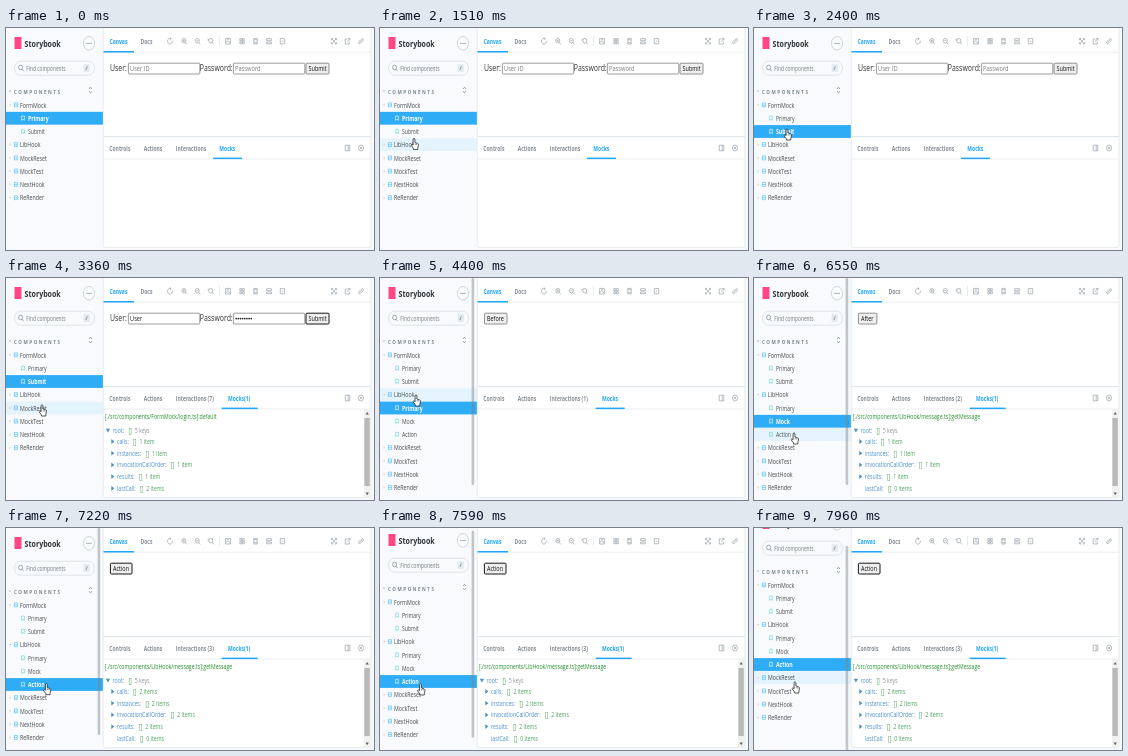
These frames come from a looping animation (368 by 222 pixels, 8 s). An HTML page:

```html
<!DOCTYPE html>
<html lang="en">
<head>
<meta charset="utf-8">
<title>Component explorer</title>
<style>
  html, body { margin: 0; width: 100%; height: 100%; overflow: hidden; background: #f8fafd; }
  svg { display: block; width: 100vw; height: 100vh; font-family: 'Open Sans', 'Noto Sans', sans-serif; }
  text { white-space: pre; }
</style>
</head>
<body>
<svg id="stage" viewBox="0 0 368 222"></svg>
<script>
const LOOP = 8000, ROW = 13.25, BAR = 12.8, FIRST_ROW = 77;
const SQUEEZE = 0.76; // the whole screen is narrower than its natural aspect
const BLUE = '#1ea7fd', GREY = '#98a2ab', TEAL = '#5fd6d2';
const stage = document.getElementById('stage');

// Screen refreshes: [start, interval, count]
const bursts = [[0, 1, 1], [840, 130, 9], [2250, 130, 9], [3360, 130, 9], [4550, 120, 9],
  [5660, 1, 1], [6030, 130, 9], [7220, 370 / 3, 7]];

const pointerPath = [[840, 58, 214], [1230, 42, 150], [1490, 34, 110.5], [1880, 33, 101], [2640, 33, 101],
  [3160, 36, 127], [3360, 36, 127], [3620, 36, 117], [4550, 36, 117], [5390, 40, 141],
  [6160, 40, 141], [6550, 40, 155], [7590, 40.5, 156], [7960, 41, 154]];
const scrollPath = [[7466, 0], [7590, 3], [7960, 20]];

// Each entry changes part of the state from its time on
const events = [
  [0, { selected: 'FormMock/Primary', open: ['FormMock'], canvas: 'empty', calls: '', mock: null }],
  [2250, { selected: 'FormMock/Submit' }],
  [2510, { canvas: 'filled', calls: ' (7)', mock: { path: 'FormMock/login.ts]:default', n: 1, last: 2 } }],
  [3750, { selected: 'LibHook/Primary', open: ['FormMock', 'LibHook'] }],
  [3880, { canvas: 'Before', calls: ' (1)', mock: null }],
  [6030, { selected: 'LibHook/Mock' }],
  [6160, { canvas: 'After', calls: ' (2)', mock: { path: 'LibHook/message.ts]:getMessage', n: 1, last: 0 } }],
  [6680, { selected: 'LibHook/Action' }],
  [6810, { canvas: 'Action', calls: ' (3)', mock: { path: 'LibHook/message.ts]:getMessage', n: 2, last: 0 } }]
];
const tree = [['FormMock', 'Primary', 'Submit'], ['LibHook', 'Primary', 'Mock', 'Action'],
  ['MockReset'], ['MockTest'], ['NextHook'], ['ReRender']];

const text = (x, y, s, size, fill, extra = '') =>
  `<text transform="translate(${x} ${y}) scale(${SQUEEZE} 1)" font-size="${size}" fill="${fill}" ${extra}>${s}</text>`;
const bold = (x, y, s, size, fill, extra = '') => text(x, y, s, size, fill, 'font-weight="700" ' + extra);
const rect = (x, y, w, h, fill, extra = '') =>
  `<rect x="${x}" y="${y}" width="${w}" height="${h}" fill="${fill}" ${extra}/>`;
const line = (d, color = GREY, width = 0.7) =>
  `<path d="${d}" fill="none" stroke="${color}" stroke-width="${width}"/>`;
const shape = (d, fill) => `<path d="${d}" fill="${fill}"/>`;
const at = (x, y, body) => `<g transform="translate(${x} ${y})">${body}</g>`;

const lens = 'M1.8 -.5a2 2.3 0 1 1 -4 0a2 2.3 0 1 1 4 0M1.2 1.2L2.8 3.2';
const icons = {
  reload: 'M1 -2.6A2.4 2.9 0 1 0 2.3 -.6M-.2 -3.4L1.2 -2.6L.2 -1.4',
  zoomIn: lens + 'M-1.2 -.5H.8M-.2 -1.7V.7',
  zoomOut: lens + 'M-1.2 -.5H.8',
  zoomReset: lens + 'M-2.8 -2.6V-.6',
  image: 'M-2.4 -2.8H2.4V2.8H-2.4ZM-2.4 1.6L-.5 -.3L2.4 2M-1 -1.5H1',
  grid: 'M-2.2 -2.6H-.4V-.5H-2.2ZM.5 -2.6H2.3V-.5H.5ZM-2.2 .5H-.4V2.6H-2.2ZM.5 .5H2.3V2.6H.5Z',
  mobile: 'M-1.7 -2.8H1.7V2.8H-1.7ZM-1.7 -1.4H1.7M-1.7 1.4H1.7',
  ruler: 'M-2.4 -2.5H2.4V-.5H-2.4ZM-2.4 .8H2.4V2.6H-2.4Z',
  outline: 'M-2.2 -2.6H2.2V2.6H-2.2ZM-.8 0H.8',
  expand: 'M-2.4 -1V-2.8H-.8M.8 -2.8H2.4V-1M2.4 1V2.8H.8M-.8 2.8H-2.4V1M-2.2 -2.6L2.2 2.6M2.2 -2.6L-2.2 2.6',
  popup: 'M0 -2.2H-2.3V2.8H1.8V.2M.5 -2.8H2.5V-.8M2.4 -2.7L-.4 .6',
  link: 'M-.4 -1L1 -2.5Q2.6 -2.8 2.4 -.8L.8 1M.4 1L-1 2.6Q-2.6 2.8 -2.4 .8L-.8 -1M-.9 1L.9 -1',
  side: 'M-2.3 -2.8H2.3V2.8H-2.3ZM.7 -2.8V2.8',
  close: 'M2.5 0a2.5 3 0 1 1 -5 0a2.5 3 0 1 1 5 0M-1 -1.2L1 1.2M1 -1.2L-1 1.2'
};
const icon = (name, x, y) => at(x, y, line(icons[name]));

function refreshTime(t) {
  const [start, gap, count] = bursts.filter(b => b[0] <= t).pop();
  return start + gap * Math.min(count - 1, Math.floor((t - start) / gap + 1e-6));
}

function along(path, t) {
  const i = path.findIndex(p => p[0] > t);
  if (i === 0) return path[0].slice(1);
  if (i < 0) return path[path.length - 1].slice(1);
  const a = path[i - 1], b = path[i], k = (t - a[0]) / (b[0] - a[0]);
  return a.slice(1).map((v, j) => v + (b[j + 1] - v) * k);
}

function visibleRows(open) {
  return tree.flatMap(([name, ...stories]) => [
    { label: name, id: name },
    ...(open.includes(name) ? stories.map(s => ({ label: s, id: name + '/' + s, leaf: true })) : [])
  ]);
}

function sidebarRow(row, i, state, pointer, scroll) {
  const y = FIRST_ROW + i * ROW, selected = row.id === state.selected;
  const hovered = pointer && Math.abs(pointer[1] + scroll - y) < ROW / 2;
  let out = '';
  if (selected) out += rect(0, y - BAR / 2, 97, BAR, '#2facf6');
  else if (hovered) out += rect(0, y - BAR / 2, 97, BAR, '#e5f3fc');
  if (row.leaf) {
    out += line(`M15.6 ${y - 2.2}H18.4V${y + 2.1}L17 ${y + 1}L15.6 ${y + 2.1}Z`, selected ? '#fff' : TEAL, 0.6);
    return out + (selected ? bold : text)(22, y + 2.6, row.label, selected ? 6.8 : 6.7, selected ? '#fff' : '#484d52');
  }
  const caret = state.open.includes(row.id) ? `M3 ${y - 0.8}H5.4L4.2 ${y + 1}Z` : `M3.6 ${y - 1.4}L5 ${y}L3.6 ${y + 1.4}Z`;
  return out + shape(caret, '#cbd3da') + line(`M8.4 ${y - 2.1}H11.4V${y + 1.9}H8.4ZM8.4 ${y}H11.4`, '#55bbf8', 0.65)
    + text(14, y + 2.6, row.label, 7, '#484d52');
}

function sidebar(state, pointer, scroll) {
  const header = rect(8.5, 9, 7, 12, '#ff4785')
    + bold(18.6, 19, 'Storybook', 9.3, '#30343a')
    + '<ellipse cx="83" cy="15.3" rx="5.6" ry="6.8" fill="#f9fbfd" stroke="#c3ced8" stroke-width=".8"/>'
    + [-2, 0, 2].map(d => `<circle cx="${83 + d}" cy="15.3" r=".6" fill="#6a737b"/>`).join('')
    + rect(8.5, 33.2, 80, 14, '#f8fafd', 'rx="5.8" ry="7" stroke="#d8dfe6" stroke-width=".8"')
    + at(14.8, 40, line(lens, '#7c868f'))
    + text(20.3, 42.6, 'Find components', 6.4, '#727a82')
    + rect(77.5, 36.3, 6.2, 7.8, '#e3e9ee', 'rx="1"') + line('M79.8 42L81.4 38.3', '#707880')
    + shape('M2.8 62.4H5.2L4 64.2Z', '#b3bcc4')
    + bold(8, 65.5, 'COMPONENTS', 6, '#7b858e', 'letter-spacing="2"')
    + line('M83.1 61L84.5 59.2L85.9 61M83.1 63.2L84.5 65L85.9 63.2', '#7b858e');
  const rows = visibleRows(state.open);
  const overflow = rows.length > 10;
  return at(0, -scroll, header + rows.map((r, i) => sidebarRow(r, i, state, pointer, scroll)).join(''))
    + (overflow ? rect(91.6, scroll * 0.9, 2.6, 207, '#7d858c', 'rx="1.3" opacity=".45"') : '');
}

function toolbar() {
  const left = [['reload', 164], ['zoomIn', 178], ['zoomOut', 191.5], ['zoomReset', 205], ['image', 222],
    ['grid', 236], ['mobile', 249.5], ['ruler', 263], ['outline', 276.5]];
  const right = [['expand', 328], ['popup', 341.5], ['link', 355]];
  return line('M97.5 24.2H365', '#e1e6eb') + rect(97.5, 23, 30.5, 1.5, BLUE)
    + bold(103.5, 16, 'Canvas', 6.6, BLUE) + bold(134.5, 16, 'Docs', 6.6, '#858d95')
    + line('M213.5 8V18', '#dfe4e9')
    + [...left, ...right].map(([n, x]) => icon(n, x, 13.2)).join('');
}

function button(x, w, label, focused) {
  return rect(x + 0.4, 35.2, w, 10.8, '#efefef', `rx="1" stroke="${focused ? '#15181a' : '#777'}" stroke-width="${focused ? 1 : 0.8}"`)
    + text(x + 3, 43.1, label, 7.2, '#111');
}

function field(x, label, value) {
  return rect(x + 0.4, 35.2, 71.4, 10.8, '#fff', 'rx=".8" stroke="#858585" stroke-width=".8"')
    + text(x + 2, 43, value || label, 7.5, value ? '#222' : '#7d7d7d');
}

function canvas(kind) {
  if (kind === 'Before') return button(104, 22.6, kind);
  if (kind === 'After') return button(104, 18.5, kind);
  if (kind === 'Action') return button(104, 21.6, kind, true);
  const filled = kind === 'filled';
  const dots = Array.from({ length: 8 }, (_, i) => `<circle cx="${230.2 + i * 2.15}" cy="40.6" r=".85" fill="#222"/>`).join('');
  return text(104, 43.4, 'User:', 9.1, '#333') + field(122, 'User ID', filled && 'User')
    + text(193.8, 43.4, 'Password:', 9.1, '#333') + field(227, 'Password', filled && ' ') + (filled ? dots : '')
    + button(299.6, 23, 'Submit', filled);
}

function treeLine(x, y, label, size, sizeColor) {
  return text(x, y, `<tspan fill="#4a8fd0">${label}:</tspan><tspan dx="5.6" fill="#4ba35a">[]</tspan>`
    + `<tspan dx="3.8" fill="${sizeColor}">${size}</tspan>`, 6.85, '#333');
}

function mockDetails({ path, n, last }) {
  const count = k => k + (k === 1 ? ' item' : ' items');
  const children = [['calls', n], ['instances', n], ['invocationCallOrder', n], ['results', n], ['lastCall', last]];
  return text(99, 141.4, '[./src/components/' + path, 6.85, '#25902d')
    + shape('M99.8 150.8H104L101.9 154.4Z', '#4a8fd0') + treeLine(106.6, 154.6, 'root', '5 keys', '#8d9298')
    + children.map(([name, k], i) => {
      const y = 163.5 + i * 11.7;
      return (k ? shape(`M105.3 ${y - 2.4}L108.4 ${y}L105.3 ${y + 2.4}Z`, '#4a8fd0') : '')
        + treeLine(111, y + 2.5, name, count(k), '#4ba35a');
    }).join('')
    + rect(358, 131.5, 6.6, 88, '#f1f1f1') + rect(358.4, 140, 5.4, 68, '#b9b9b9')
    + shape('M359.6 136.6L361.2 134L362.8 136.6Z', '#606060') + shape('M359.6 214.6L361.2 217.2L362.8 214.6Z', '#606060');
}

function addons({ calls, mock }) {
  const x = calls ? 222 : 213.3, w = mock ? 36 : 29;
  return line('M97.5 108.6H365', '#d9dfe5', 0.9) + line('M97.5 131H365', '#e1e6eb')
    + [['Controls', 103.3], ['Actions', 137.7], ['Interactions' + calls, 169.8]]
      .map(([s, tx]) => bold(tx, 123, s, 6.6, '#858d95')).join('')
    + bold(x, 123, mock ? 'Mocks(1)' : 'Mocks', 6.6, BLUE) + rect(x - 6.3, 129.6, w, 1.5, BLUE)
    + icon('side', 341.5, 120) + icon('close', 355, 120)
    + (mock ? mockDetails(mock) : '');
}

const hand = ([x, y]) => at(x, y, '<path d="M-.9 .4Q0 -.8 .9 .4V4L3.6 4.8Q4.6 5.2 4.4 7L3.8 9.6V11H-.6V9.8L-3 6.6Q-2.6 5.2 -.9 6.6Z" '
  + 'fill="#fff" stroke="#222" stroke-width=".75" stroke-linejoin="round"/>' + line('M1.2 5V6.4M2.7 5.2V6.6', '#222', 0.5));

function draw(t) {
  const state = Object.assign({}, ...events.filter(e => e[0] <= t).map(e => e[1]));
  const pointer = t >= 840 ? along(pointerPath, t) : null;
  const [scroll] = along(scrollPath, t);
  stage.innerHTML = rect(0, 0, 368, 222, '#f8fafd') + sidebar(state, pointer, scroll)
    + rect(97.3, -6, 267.7, 225.5, '#fff', 'rx="2" stroke="#dfe5ea" stroke-width=".7"')
    + toolbar() + canvas(state.canvas) + addons(state) + (pointer ? hand(pointer) : '');
}

let shown = -1;
function tick(now) {
  const t = refreshTime(now % LOOP);
  if (t !== shown) draw(shown = t);
  requestAnimationFrame(tick);
}
tick(performance.now());
</script>
</body>
</html>
```
